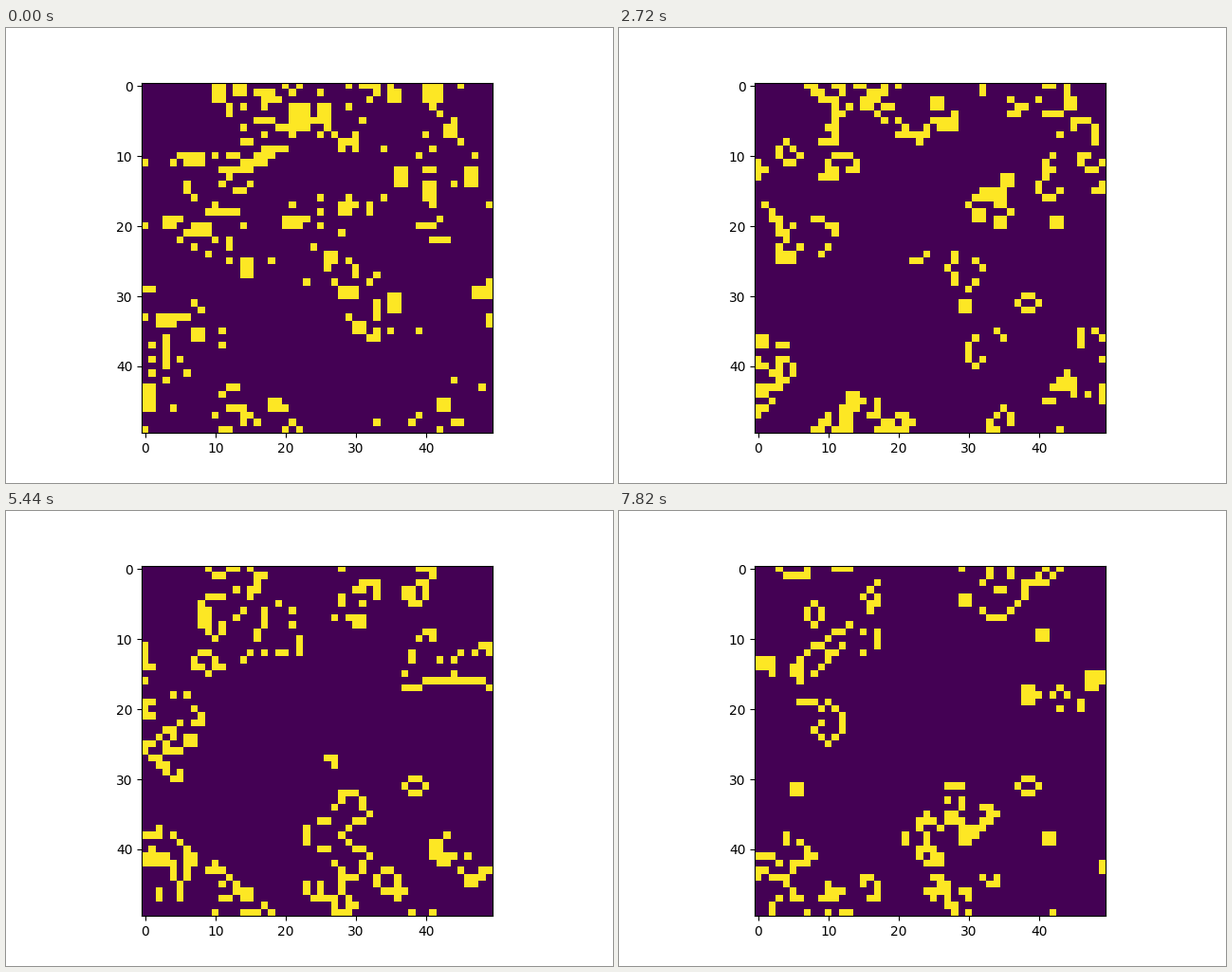
These frames come from a looping animation (640 by 480 pixels, 7990 ms). A matplotlib script:

```python
import numpy as np
import matplotlib.pyplot as plt
from matplotlib.animation import FuncAnimation

SIZE = 50
FRAMES = 47
INTERVAL = 170

# Dense blocks of the starting colony: column, row, width, height
BLOCKS = [
    (10, 0, 2, 3), (13, 0, 2, 2), (17, 1, 2, 2), (40, 0, 3, 3), (35, 1, 2, 2),
    (31, 0, 3, 1), (21, 3, 3, 4), (25, 3, 2, 3), (16, 5, 3, 1), (43, 6, 2, 2),
    (28, 8, 3, 1), (6, 10, 3, 2), (11, 12, 5, 1), (14, 11, 4, 1), (17, 9, 2, 2),
    (46, 12, 2, 3), (36, 12, 2, 3), (40, 14, 2, 3), (28, 17, 2, 2), (9, 18, 5, 1),
    (3, 19, 2, 2), (7, 20, 3, 2), (20, 19, 3, 2), (39, 20, 3, 1), (26, 24, 2, 2),
    (14, 25, 2, 3), (28, 29, 3, 2), (35, 30, 2, 3), (47, 29, 3, 2), (2, 33, 3, 2),
    (30, 34, 2, 2), (7, 35, 2, 2), (3, 36, 1, 5), (0, 43, 2, 4), (12, 46, 3, 1),
    (42, 45, 2, 2), (18, 45, 2, 2),
]
SCATTER = 5   # loose cells around each block
REACH = 3     # how far they may lie from it


def start_grid(seed=7):
    rng = np.random.default_rng(seed)
    grid = np.zeros((SIZE, SIZE), dtype=int)
    for x, y, w, h in BLOCKS:
        grid[y:y + h, x:x + w] = 1
        cols = rng.integers(x - REACH, x + w + REACH, SCATTER) % SIZE
        rows = rng.integers(y - REACH, y + h + REACH, SCATTER) % SIZE
        grid[rows, cols] = 1
    return grid


def step(grid):
    """One generation of Conway's Game of Life on a torus."""
    near = sum(np.roll(grid, (dy, dx), (0, 1))
               for dy in (-1, 0, 1) for dx in (-1, 0, 1) if dx or dy)
    return ((near == 3) | ((grid == 1) & (near == 2))).astype(int)


generations = [start_grid()]
while len(generations) < FRAMES:
    generations.append(step(generations[-1]))

fig, ax = plt.subplots(figsize=(6.4, 4.8), dpi=100)
image = ax.imshow(generations[0], cmap="viridis", vmin=0, vmax=1,
                  interpolation="nearest")


def update(i):
    image.set_data(generations[i])
    return [image]


anim = FuncAnimation(fig, update, frames=FRAMES, interval=INTERVAL,
                     repeat=True, repeat_delay=0)
plt.show()
```
